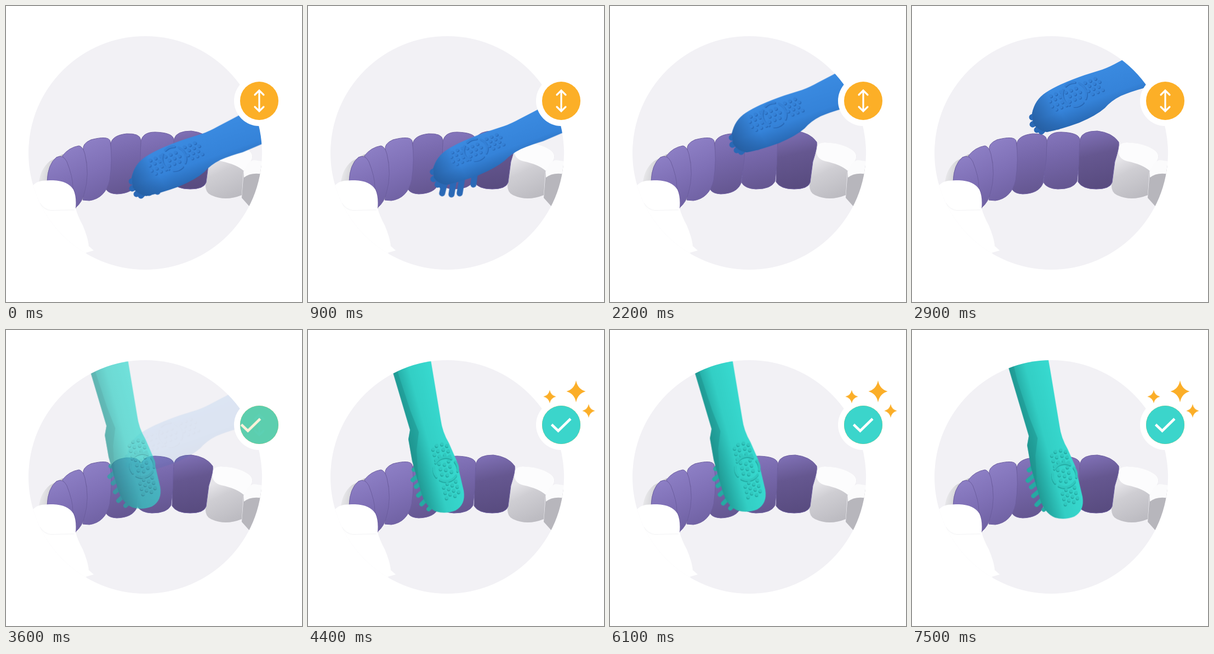
An HTML page without scripts that plays this animation: 540x540 px, repeating every 7.6 s.

```html
<!DOCTYPE html>
<html lang="en">
<head>
<meta charset="utf-8">
<title>Brushing technique</title>
<style>
  :root { --beat: 844.444ms; --half: 422.222ms; --sine: cubic-bezier(.37, 0, .63, 1); }
  html, body { margin: 0; width: 100%; height: 100%; overflow: hidden; background: #fff; }
  svg { display: block; width: 100vw; height: 100vh; }

  .blue-fade { animation: blue-fade 7.6s linear infinite; }
  .teal-fade { animation: teal-fade 7.6s linear infinite; }
  .done-fade { animation: done-fade 7.6s linear infinite; }
  .check { animation: check 7.6s ease-out infinite; }
  .stars use { animation: pop 7.6s ease-out infinite; }

  /* blue: up and down, nine strokes per loop */
  .sweep { animation: sweep var(--beat) -82ms var(--sine) infinite; }
  .roll { transform-origin: 310px 200px; animation: roll var(--beat) -82ms infinite; }
  .tuft { animation: tuft var(--beat) -82ms infinite; }

  /* teal: small tilted circles */
  .rub-x, .rub-tuft { animation: rub-x var(--half) -566.4ms var(--sine) infinite alternate; }
  .rub-y { animation: rub-y var(--half) var(--sine) infinite alternate; }
  .rub-tuft { animation-name: rub-tuft; }

  @keyframes blue-fade {
    0%, 43.42% { opacity: 1; }
    47.9%, 100% { opacity: 0; }
  }
  @keyframes teal-fade {
    0%, 43.42% { opacity: 0; }
    49.1%, 100% { opacity: 1; }
  }
  @keyframes done-fade {
    0%, 43.42% { opacity: 0; }
    48.2%, 100% { opacity: 1; }
  }
  @keyframes check {
    0%, 46% { transform: translateX(-28px); }
    50.5%, 100% { transform: none; }
  }
  @keyframes pop {
    0%, 48.5% { transform: scale(0); }
    52.5%, 100% { transform: scale(1); }
  }
  @keyframes sweep {
    0%, 100% { transform: translate(8px, 96px); }
    53.3% { transform: translate(-3px, -31px); }
  }
  @keyframes roll {
    0%, 9%, 36%, 100% { transform: scaleY(1); }
    17%, 22% { transform: scaleY(.88); }
  }
  @keyframes tuft {
    0%, 9%, 36%, 100% { transform: translate(-2px, -22px); }
    17%, 22% { transform: none; }
  }
  @keyframes rub-x {
    from { transform: translateX(-5px); }
    to { transform: translateX(27px); }
  }
  @keyframes rub-y {
    from { transform: translateY(20px); }
    to { transform: translateY(-24px); }
  }
  @keyframes rub-tuft {
    from { transform: none; }
    to { transform: translate(-8px, -12px); }
  }
</style>
</head>
<body>
<svg viewBox="0 0 540 540">
  <defs>
    <clipPath id="disc"><circle cx="254" cy="268" r="213"/></clipPath>
    <clipPath id="button"><circle cx="462" cy="173" r="35"/></clipPath>

    <linearGradient id="purple" x1=".4" y1="0" x2=".6" y2="1">
      <stop offset="0" stop-color="#8d7fc5"/>
      <stop offset=".5" stop-color="#7f70b6"/>
      <stop offset="1" stop-color="#6f61a2"/>
    </linearGradient>
    <linearGradient id="plum" x1=".4" y1="0" x2=".55" y2="1">
      <stop offset="0" stop-color="#8475bb"/>
      <stop offset=".4" stop-color="#7667aa"/>
      <stop offset="1" stop-color="#645690"/>
    </linearGradient>
    <linearGradient id="dark" x1=".4" y1="0" x2=".55" y2="1">
      <stop offset="0" stop-color="#7f70b5"/>
      <stop offset=".4" stop-color="#655790"/>
      <stop offset="1" stop-color="#584b7f"/>
    </linearGradient>
    <linearGradient id="grey" x1=".2" y1="0" x2=".6" y2="1">
      <stop offset=".25" stop-color="#e6e5e9"/>
      <stop offset=".5" stop-color="#cfced3"/>
      <stop offset="1" stop-color="#bbbac0"/>
    </linearGradient>
    <linearGradient id="sliver" x1="0" y1="0" x2="1" y2=".3">
      <stop offset="0" stop-color="#f6f6f7"/>
      <stop offset="1" stop-color="#bdbcc2"/>
    </linearGradient>
    <linearGradient id="blue" gradientUnits="userSpaceOnUse" x1="295" y1="165" x2="322" y2="240">
      <stop offset="0" stop-color="#3a8ae0"/>
      <stop offset=".6" stop-color="#3583d9"/>
      <stop offset="1" stop-color="#2869b4"/>
    </linearGradient>
    <linearGradient id="tip" gradientUnits="userSpaceOnUse" x1="226" y1="247" x2="272" y2="222">
      <stop offset="0" stop-color="#245a9b" stop-opacity=".85"/>
      <stop offset="1" stop-color="#245a9b" stop-opacity="0"/>
    </linearGradient>
    <linearGradient id="teal" gradientUnits="userSpaceOnUse" x1="192" y1="258" x2="274" y2="236">
      <stop offset="0" stop-color="#1f928d"/>
      <stop offset=".25" stop-color="#27b0a9"/>
      <stop offset=".5" stop-color="#33cfc5"/>
      <stop offset="1" stop-color="#38dad0"/>
    </linearGradient>

    <path id="head" d="M222 227Q227 202 247 189Q269 174 318 157L350 147Q364 142 380 133L405 120L510 64V146L460 166L425 181Q403 187 384 195Q366 204 355 217Q339 231 308 244Q275 256 249 261Q233 259 224 245Z"/>

    <!-- raised dots and broken ring, centred on the brush head -->
    <g id="grip" fill="none" stroke="currentColor" stroke-linecap="round">
      <path stroke-width="6" stroke-dasharray="0 10"
        d="M-46-5h22M-41-13h22M-46 5h22M-41 13h22M-13-9h28M-9 0h22M-13 9h28M26-12h22M31-4h22M26 4h22M31 12h22"/>
      <path stroke-width="4"
        d="M-16-15A22 22 0 0 0-16 15M16-15A22 22 0 0 1 16 15M-9-20A22 22 0 0 1 9-20M-9 20A22 22 0 0 0 9 20"/>
    </g>
    <path id="star" fill="#fbae28" d="M0-20Q3-4 17.5 0Q3 4 0 20Q-3 4-17.5 0Q-3-4 0-20Z"/>
  </defs>

  <circle cx="254" cy="268" r="213" fill="#f2f1f5"/>

  <g clip-path="url(#disc)">
    <!-- white teeth on the right -->
    <path fill="url(#grey)" d="M374 262Q377 250 390 249Q425 250 444 264Q453 272 447 283L433 302L430 345Q400 357 374 345Q363 340 364 325Z"/>
    <path fill="#fcfcfd" d="M378 256Q380 249 392 249Q425 250 444 264Q453 272 447 283L434 301Q421 289 392 283Q372 277 378 256Z"/>
    <path fill="#b7b6bc" d="M434 301Q440 290 470 292V370H448L430 350Z"/>
    <path fill="#fbfbfc" d="M434 301Q440 284 452 281L480 285V310Q450 300 434 313Z"/>

    <!-- white tooth on the far left -->
    <path fill="url(#sliver)" d="M60 322Q63 297 80 283L104 270L90 322Z"/>

    <!-- purple row -->
    <g stroke="#6c5e9f" stroke-width="1" stroke-linejoin="round">
      <path fill="url(#dark)" d="M304 270L307 242Q311 228 338 228Q365 231 377 248Q379 256 370 284L365 322Q361 334 336 334Q311 334 303 321Z"/>
      <path fill="url(#plum)" d="M246 250Q247 230 272 230Q304 231 306 243L304 290L301 320Q294 334 266 334Q246 333 240 322L244 285Z"/>
      <path fill="url(#plum)" d="M191 252Q193 236 220 233Q244 232 246 244L245 280L239 323Q232 342 202 343Q187 342 183 335L191 295Z"/>
      <path fill="url(#purple)" d="M141 262Q139 251 155 244Q186 236 190 246Q195 280 189 318Q181 351 152 355L140 354Q150 315 147 285Z"/>
      <path fill="url(#purple)" d="M103 273Q115 258 133 255Q140 256 144 270Q153 308 143 341Q139 358 127 368L119 320Z"/>
      <path fill="url(#purple)" d="M75 320Q76 289 92 276Q104 270 111 284Q122 312 122 330Q130 350 127 369L118 345L100 325Z"/>
    </g>

    <!-- near tooth and gum -->
    <path fill="#fff" d="M40 334L53 324Q60 317 86 318Q113 319 123 335Q129 348 127 369Q131 384 140 400Q150 424 151 438L160 446L146 450L148 456L90 480L20 430Z"/>
    <path fill="none" stroke="#f8f8f9" stroke-width="2" stroke-linecap="round" d="M62 360Q70 372 82 373L124 372"/>

    <g class="blue-fade">
      <g class="sweep">
        <g fill="none" stroke="#2a69b6" stroke-width="11" stroke-linecap="round">
          <path d="M243 224L222 234M243 235L223 247M250 240L231 257M254 244L239 260"/>
          <path class="tuft" d="M238 240L231 257M246 245L239 273M261 245L256 275M276 242L271 273M299 234L296 257"/>
        </g>
        <g transform="rotate(-24 310 200)"><g class="roll"><g transform="rotate(24 310 200)">
          <use href="#head" fill="url(#blue)"/>
          <use href="#head" fill="url(#tip)"/>
          <g transform="translate(300 193) rotate(-22)">
            <use href="#grip" color="#2767b5"/>
            <use href="#grip" x="-.8" y="-1.6" color="#3581d6"/>
          </g>
        </g></g></g>
      </g>
    </g>

    <g class="teal-fade">
      <g class="rub-x"><g class="rub-y">
        <path class="rub-tuft" fill="none" stroke="#25aaa3" stroke-width="8" stroke-linecap="round"
          d="M207 244L195 253M208 259L193 272M212 274L199 284M217 288L203 300M222 303L209 316M232 315L222 325"/>
        <path fill="url(#teal)" d="M128-20L157 78L187 179L184 196L191 236L207 292Q215 320 235 328Q252 333 270 326Q289 315 285 290L272 235L258 203Q246 183 243 160L226 58L212-20Z"/>
        <path fill="#1c8d88" opacity=".45" d="M128-20L157 78L187 179L184 196L191 236L202 275L199 215L203 183L188 145L166 78L142-20Z"/>
        <g transform="translate(252 252) rotate(75)">
          <use href="#grip" color="#1f9f98"/>
          <use href="#grip" x="-1.4" y="-.8" color="#31c8bf"/>
        </g>
      </g></g>
    </g>
  </g>

  <!-- badge -->
  <circle cx="462" cy="173" r="46" fill="#fff"/>
  <circle cx="462" cy="173" r="35" fill="#fcaf27"/>
  <path class="blue-fade" fill="none" stroke="#fff" stroke-width="3.2" stroke-linecap="round" d="M462 155V191M454 162L462 154L470 162M454 184L462 192L470 184"/>
  <g class="done-fade" clip-path="url(#button)">
    <circle cx="462" cy="173" r="36" fill="#3bd5cb"/>
    <path class="check" fill="none" stroke="#fff" stroke-width="4.6" d="M444.500 172.500L456.500 184L479 162"/>
  </g>

  <g class="stars">
    <g transform="translate(489 112)"><use href="#star"/></g>
    <g transform="translate(441 121.500) scale(.66 .6)"><use href="#star"/></g>
    <g transform="translate(512 147.500) scale(.66 .62)"><use href="#star"/></g>
  </g>
</svg>
</body>
</html>
```
